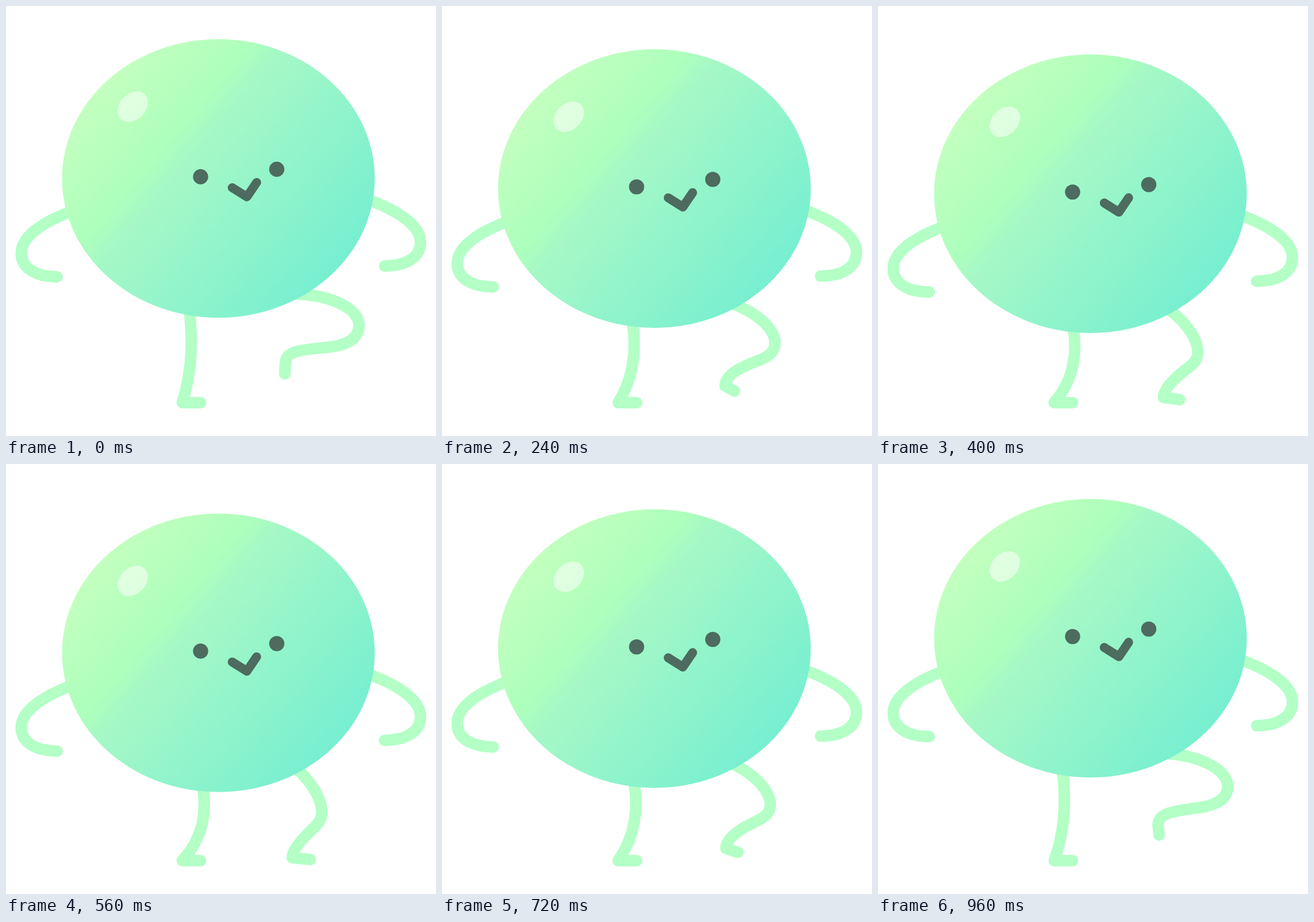
Animation, 748 px wide and 748 px high, one loop 1 s. Source, as an HTML page:

```html
<!DOCTYPE html>
<html lang="en">
<head>
<meta charset="utf-8">
<title>Bouncing blob</title>
<style>
html, body { margin: 0; width: 100%; height: 100%; overflow: hidden; background: #fff; }
svg { display: block; width: 100%; height: 100%; }
.limb { fill: none; stroke: #b3ffc6; stroke-width: 20; stroke-linecap: round; stroke-linejoin: round; }
.face { fill: #4d6b5f; }
.mouth { fill: none; stroke: #4d6b5f; stroke-width: 15.5; stroke-linecap: round; stroke-linejoin: round; }
</style>
</head>
<body>
<svg viewBox="0 0 748 748">
  <defs>
    <linearGradient id="skin" gradientUnits="userSpaceOnUse" x1="171" y1="132.6" x2="568" y2="467.4">
      <stop offset="0" stop-color="#c3ffbf"/>
      <stop offset=".29" stop-color="#adffbc"/>
      <stop offset=".375" stop-color="#a6f8c6"/>
      <stop offset="1" stop-color="#77efd0"/>
    </linearGradient>
  </defs>
  <path id="standLeg" class="limb"/>
  <path id="freeLeg" class="limb"/>
  <g id="body">
    <path id="arm" class="limb" d="M120 355C72 372 26.5 398 26.5 430C26.5 456 52 471 89 471"/>
    <use href="#arm" transform="translate(747.5 -18.8) scale(-1 1)"/>
    <ellipse cx="369.5" cy="300" rx="272" ry="242.3" fill="url(#skin)"/>
    <ellipse cx="220.5" cy="175" rx="30" ry="22.5" transform="rotate(-45 220.5 175)" fill="#fff" opacity=".53"/>
    <circle class="face" cx="338.5" cy="297" r="13.2"/>
    <circle class="face" cx="471" cy="284" r="13.2"/>
    <path class="mouth" d="M393.5 316L419 332L436 307"/>
  </g>
</svg>
<script>
const LOOP = 1000, STEP = 40, DROP = 28.8, LOW = 500, LIFT = 525;
const el = id => document.getElementById(id);
const body = el('body');

// Each leg blends between a high and a low pose: hip, curves, then the toe.
const legs = [
  {
    path: el('standLeg'),
    high: [319, 531, 325, 580, 324, 635, 306.5, 690, 338.5, 690],
    low: [342, 560, 351, 600, 345, 650, 306.5, 690, 338.5, 690]
  },
  {
    path: el('freeLeg'),
    high: [500, 501, 560, 501, 614, 525, 614, 555, 614, 585, 580, 592, 556, 594,
      510, 599, 487, 600, 486, 621, 485, 640],
    low: [500, 526, 525, 547, 547, 580, 547, 607, 547, 619, 541, 627, 533, 635,
      519, 650, 498, 671, 498.5, 686, 531, 688.5]
  }
];

function bezier(x1, y1, x2, y2) {
  const at = (a, b, s) => 3 * (1 - s) * (1 - s) * s * a + 3 * (1 - s) * s * s * b + s * s * s;
  return x => {
    let lo = 0, hi = 1;
    for (let i = 0; i < 30; i++) {
      const mid = (lo + hi) / 2;
      if (at(x1, x2, mid) < x) lo = mid; else hi = mid;
    }
    return at(y1, y2, lo);
  };
}
const sink = bezier(.167, .167, .667, 1);
const rise = bezier(.22, .27, .7, 1);

function depthAt(t) {
  if (t < LOW) return sink(t / LOW);
  return t < LIFT ? 1 : rise((LOOP - t) / (LOOP - LIFT));
}

function drawLeg({ path, high, low }, lift) {
  // Knees swing sideways faster near the bottom than the body falls.
  const swing = lift ** .77;
  const p = low.map((v, i) => v + (high[i] - v) * (i % 2 ? lift : swing));
  path.setAttribute('d', `M${p.slice(0, 2)}C${p.slice(2, -2)}L${p.slice(-2)}`);
}

function draw(t) {
  const depth = depthAt(t);
  body.setAttribute('transform', `translate(0 ${DROP * depth})`);
  for (const leg of legs) drawLeg(leg, Math.max(0, 1 - depth));
}

const start = performance.now();
function tick() {
  const t = (performance.now() - start) % LOOP;
  draw(Math.floor(t / STEP) * STEP);
  requestAnimationFrame(tick);
}
draw(0);
requestAnimationFrame(tick);
</script>
</body>
</html>
```
